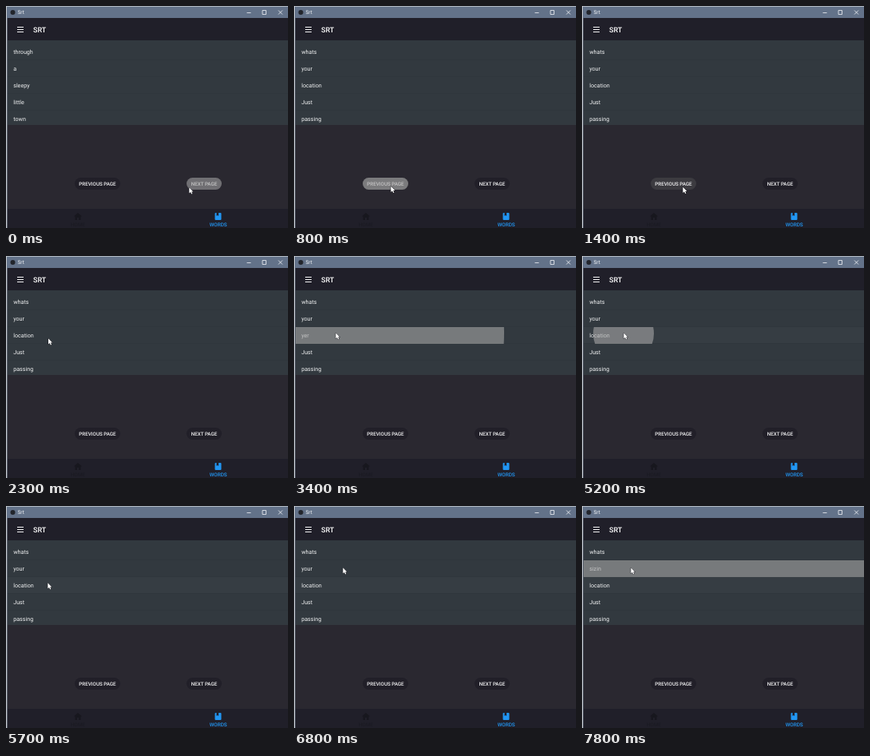
Animation, 353 px wide and 278 px high, one loop 8000 ms. Source, as an HTML page with a canvas:

```html
<!DOCTYPE html>
<html lang="en">
<head>
<meta charset="utf-8">
<title>Srt</title>
<style>
html, body { margin: 0; height: 100%; overflow: hidden; background: #2a2830; }
canvas { display: block; }
</style>
</head>
<body>
<canvas id="stage" width="353" height="278"></canvas>
<script>
const ctx = document.getElementById('stage').getContext('2d');
const LOOP = 8000, STEP = 100;
const ROW_TOP = 47, ROW_H = 21;

// Pointer path: time, x, y
const pointerKeys = [
  [0, 229, 227], [300, 121, 225.5], [1200, 121, 225.5], [1300, 124, 226], [1400, 126, 226.5],
  [1500, 122, 221], [1900, 66, 141], [2100, 54, 117], [2400, 52, 96],
  [6400, 52, 96], [6800, 61, 77], [LOOP, 61, 77]
];

const prevButton = { x: 86, y: 215, w: 57, h: 15, r: 7.5, label: 'PREVIOUS PAGE' };
const nextButton = { x: 226, y: 215, w: 44, h: 15, r: 7.5, label: 'NEXT PAGE' };
const row = i => ({ x: 2, y: ROW_TOP + i * ROW_H, w: 351, h: ROW_H, r: 0 });

// Each ripple grows for one step, holds, then fades out over 300 ms until `end`
const ripples = [
  { box: nextButton, start: -200, end: 300, cx: 248, cy: 222, radius: 20 },
  { box: prevButton, start: 700, end: 1100, cx: 123, cy: 226, radius: 24 },
  { box: row(2), start: 3400, end: 3900, cx: 52, cy: 97, radius: 211 },
  { box: row(2), start: 5200, end: 5700, cx: 52, cy: 97, radius: 38 },
  { box: row(1), start: 7700, end: 8300, cx: 61, cy: 78, radius: 110 }
];

function wordsAt(t) {
  if (t < 700) return ['through', 'a', 'sleepy', 'little', 'town'];
  return ['whats', t < 7700 ? 'your' : 'sizin',
    t >= 3400 && t < 5200 ? 'yer' : 'location', 'Just', 'passing'];
}

function pointerAt(t) {
  const i = pointerKeys.findIndex(k => k[0] > t);
  const [t0, x0, y0] = pointerKeys[i - 1], [t1, x1, y1] = pointerKeys[i];
  const p = (t - t0) / (t1 - t0);
  return [x0 + (x1 - x0) * p, y0 + (y1 - y0) * p];
}

function rect(x, y, w, h, color) {
  ctx.fillStyle = color;
  ctx.fillRect(x, y, w, h);
}

function text(str, x, y, size, color, weight = 400, align = 'left') {
  ctx.font = `${weight} ${size}px Roboto, sans-serif`;
  ctx.textAlign = align;
  ctx.fillStyle = color;
  ctx.fillText(str, x, y);
}

function shape(d, color, x = 0, y = 0) {
  ctx.save();
  ctx.translate(x, y);
  ctx.fillStyle = color;
  ctx.fill(new Path2D(d));
  ctx.restore();
}

function line(d, color, width = 1) {
  ctx.strokeStyle = color;
  ctx.lineWidth = width;
  ctx.stroke(new Path2D(d));
}

function roundBox(b) {
  ctx.beginPath();
  ctx.roundRect(b.x, b.y, b.w, b.h, b.r);
}

function drawWindow() {
  rect(0, 0, 353, 278, '#2a2830');
  rect(0, 0, 353, 15, '#637289');
  rect(0, 0, 353, 1, '#b4bcc6');
  ctx.fillStyle = '#22252c';
  ctx.beginPath();
  ctx.arc(8.5, 8, 3, 0, 7);
  ctx.fill();
  text('Srt', 14.5, 10.3, 6.5, '#f2f4f6');
  line('M301.5 8.5h5M321 5.5h4.5v5h-4.5zM341 5.5l5 5m0-5l-5 5', '#f0f2f5', 0.8);

  rect(0, 15, 353, 28, '#201f29');
  line('M14 26.5h8M14 29.5h8M14 32.5h8', '#f4f4f5');
  text('SRT', 34, 32.6, 9, '#ffffff', 500);
}

function drawList(t) {
  rect(0, 43, 353, 106, '#32393f');
  if (t >= 3900) rect(2, 89, 351, 21, '#363d43');
  for (let i = 1; i < 5; i++) rect(2, ROW_TOP + i * ROW_H - 1, 351, 1, '#2f363c');
  wordsAt(t).forEach((word, i) => text(word, 9.2, 59.5 + i * ROW_H, 7.15, '#f0f1f2'));
}

function drawButton(b, hovered) {
  roundBox(b);
  ctx.fillStyle = hovered ? '#3c3b40' : '#211f28';
  ctx.fill();
  text(b.label, b.x + b.w / 2, 225, 6.25, '#f4f4f5', 500, 'center');
}

function drawNav() {
  rect(0, 254, 353, 24, '#201f29');
  shape('M0-5l5 4.5h-1.5v4.5h-2.5v-3h-2v3h-2.5v-4.5h-1.5z', '#17171e', 90, 264);
  text('HOME', 90, 275.7, 6.3, '#1b1b23', 500, 'center');
  shape('M-3-4.5h1v4l1.3-.9 1.3.9v-4h2.4q1 0 1 1v7q0 1-1 1h-6q-1 0-1-1v-7q0-1 1-1z',
    '#2196f3', 265.5, 263.5);
  text('WORDS', 265.7, 275.7, 6.4, '#2196f3', 500, 'center');
}

function drawRipple(r, t) {
  if (t < r.start || t >= r.end) return;
  const fade = Math.min(1, (r.end - t) / 300);
  ctx.save();
  roundBox(r.box);
  ctx.clip();
  ctx.beginPath();
  ctx.arc(r.cx, r.cy, t < r.start + STEP ? r.radius : 400, 0, 7);
  ctx.fillStyle = `rgba(165, 165, 165, ${0.6 * fade})`;
  ctx.fill();
  ctx.restore();
}

function drawPointer(t) {
  const [x, y] = pointerAt(t);
  ctx.save();
  ctx.translate(x, y);
  const arrow = 'M.3.3v7.2l1.7-1.6 1.2 2.6 1.2-.5-1.2-2.6h2.2z';
  line(arrow, '#15151a', 0.9);
  shape(arrow, '#ffffff');
  ctx.restore();
}

function draw(t) {
  drawWindow();
  drawList(t);
  drawButton(prevButton, t >= 700 && t < 1600);
  drawButton(nextButton, false);
  drawNav();
  ripples.forEach(r => drawRipple(r, t));
  rect(0, 0, 1, 278, '#c8ccd1');
  rect(1, 15, 1, 263, '#59616e');
  drawPointer(t);
}

function frame() {
  const t = performance.now() % LOOP;
  draw(Math.floor(t / STEP) * STEP);
  requestAnimationFrame(frame);
}

ctx.textRendering = 'geometricPrecision';
frame();
</script>
</body>
</html>
```
